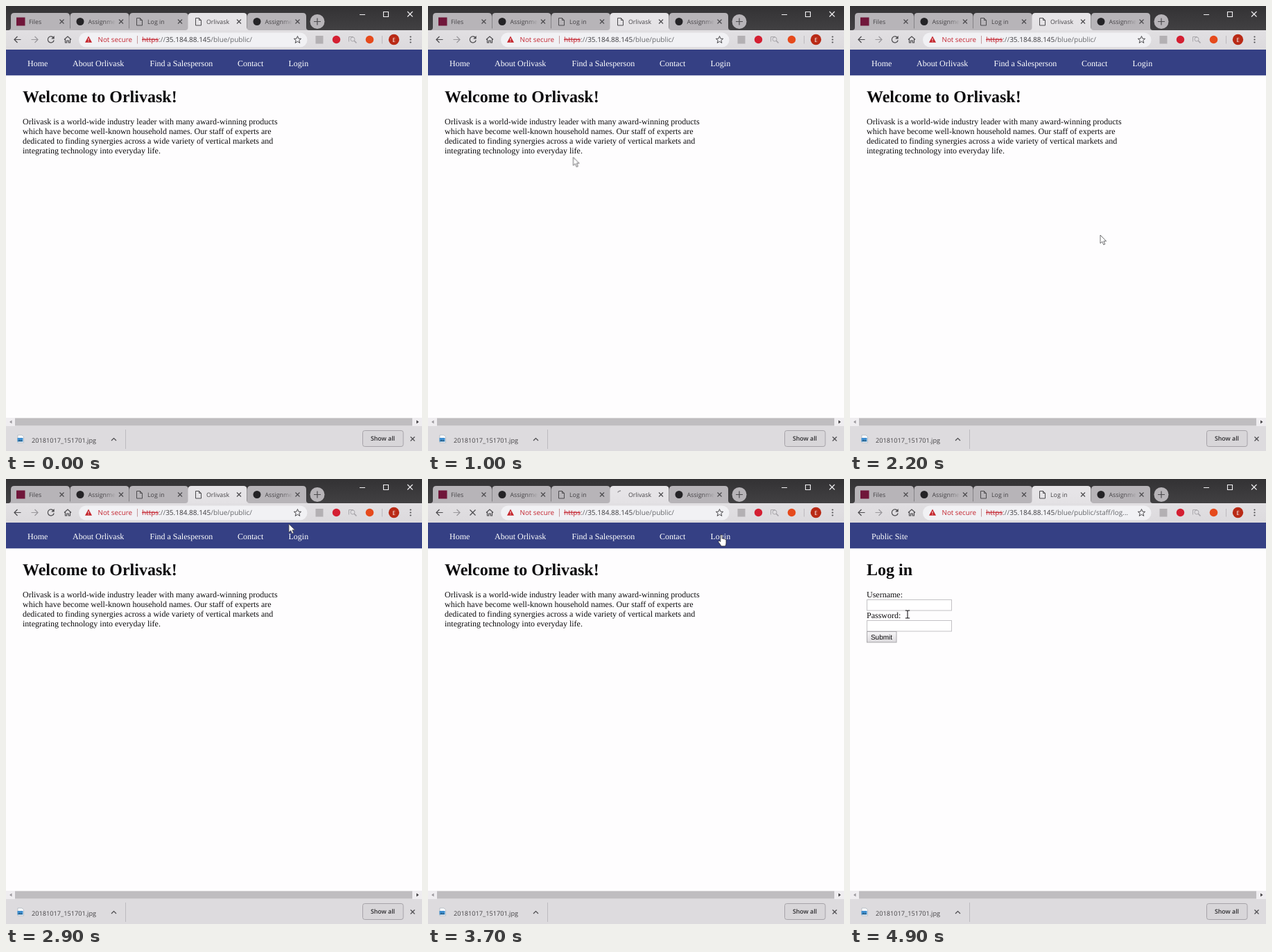
Recreate the animation shown at these times as an HTML page. Size 600 by 643 pixels, loop 5 s.

```html
<!DOCTYPE html>
<html lang="en">
<head>
<meta charset="utf-8">
<title>Browser login</title>
<style>
  html, body { margin: 0; width: 100%; height: 100%; overflow: hidden; background: #fefdfe; }
  svg { display: block; width: 600px; height: 643px; }
  text { white-space: pre; text-rendering: geometricPrecision; }

  .ui { font-family: "Open Sans", "Noto Sans", sans-serif; font-size: 8.8px; fill: #454346; }
  .url { font-size: 10px; fill: #66676b; }
  .page { font: 12px "Liberation Serif", "Times New Roman", serif; fill: #0c0b0d; }
  .nav { fill: #fff; }
  h1, .h1 { font-size: 24px; font-weight: bold; }
  .line { fill: none; stroke: #4c4b4e; stroke-width: 1.2; }
  .field { fill: #fff; stroke: #c3c1c5; }

  /* Page state: idle, loading, login page */
  .home, .login, .idle, .busy, .arrow, .hand, .beam { animation: 5s step-end infinite; }
  .home  { animation-name: home; }
  .login { animation-name: login; }
  .idle  { animation-name: idle; }
  .busy  { animation-name: busy; }
  .arrow { animation-name: arrow; }
  .hand  { animation-name: hand; }
  .beam  { animation-name: beam; }
  @keyframes home  { 0% { visibility: visible } 82%, 100% { visibility: hidden } }
  @keyframes login { 0% { visibility: hidden } 82%, 100% { visibility: visible } }
  @keyframes idle  { 0% { visibility: visible } 72% { visibility: hidden } 82%, 100% { visibility: visible } }
  @keyframes busy  { 0% { visibility: hidden } 72% { visibility: visible } 82%, 100% { visibility: hidden } }
  @keyframes arrow {
    0% { visibility: hidden } 4% { visibility: visible } 62% { visibility: hidden }
    82% { visibility: visible } 94%, 100% { visibility: hidden }
  }
  @keyframes hand { 0% { visibility: hidden } 62% { visibility: visible } 82%, 100% { visibility: hidden } }
  @keyframes beam { 0% { visibility: hidden } 94%, 100% { visibility: visible } }

  /* The pointer moves ten times a second */
  .pointer { animation: move 5s infinite; }
  @keyframes move {
    0%   { transform: translate(112px, 300px); animation-timing-function: step-end }
    4%   { transform: translate(112px, 300px); animation-timing-function: steps(3) }
    10%  { transform: translate(151px, 229px); animation-timing-function: steps(10) }
    30%  { transform: translate(268px, 208px); animation-timing-function: steps(7) }
    44%  { transform: translate(361px, 331px); animation-timing-function: steps(7) }
    58%  { transform: translate(408px, 65px);  animation-timing-function: steps(2) }
    62%  { transform: translate(423px, 81px);  animation-timing-function: step-end }
    84%  { transform: translate(423px, 81px);  animation-timing-function: steps(7) }
    98%, 100% { transform: translate(83px, 196px) }
  }

  .spin { transform-origin: 278px 22.5px; animation: spin 5s infinite; }
  @keyframes spin {
    0%   { transform: rotate(50deg); animation-timing-function: step-end }
    72%  { transform: rotate(50deg); animation-timing-function: steps(5) }
    82%, 100% { transform: rotate(-200deg) }
  }
</style>
</head>
<body>
<svg viewBox="0 0 600 643">
  <defs>
    <linearGradient id="bar" x2="0" y2="1">
      <stop stop-color="#333234"/><stop offset="1" stop-color="#424143"/>
    </linearGradient>
    <linearGradient id="chrome" gradientUnits="userSpaceOnUse" x1="0" y1="10" x2="0" y2="63">
      <stop stop-color="#e6e4e7"/><stop offset="1" stop-color="#dcdadd"/>
    </linearGradient>
    <linearGradient id="button" x2="0" y2="1">
      <stop stop-color="#f7f6f8"/><stop offset="1" stop-color="#dcdadd"/>
    </linearGradient>
    <linearGradient id="fade" gradientUnits="userSpaceOnUse" x1="24" y1="0" x2="40" y2="0">
      <stop stop-color="#454346"/><stop offset="1" stop-color="#454346" stop-opacity="0"/>
    </linearGradient>
    <path id="tab" d="M-4 25Q0 25 0 21V5Q0 0 5 0H80Q85 0 85 5V21Q85 25 89 25Z"/>
    <path id="cross" d="M-3-3 3 3M3-3-3 3"/>
    <path id="sheet" d="M.5.5H5.5L8.5 3.5V11H.5ZM5.5.5V3.5H8.5"/>
    <text id="cut" fill="url(#fade)">Assignme</text>
  </defs>

  <!-- Window frame and tabs -->
  <rect width="600" height="36" fill="url(#bar)"/>
  <g fill="#b7b4b8">
    <use href="#tab" x="7" y="10"/>
    <use href="#tab" x="92.5" y="10"/>
    <use href="#tab" x="178" y="10"/>
    <use href="#tab" x="348" y="10"/>
    <circle cx="449" cy="22.5" r="10.5"/>
  </g>
  <path d="M92.5 15V30M177.5 15V30" stroke="#858387"/>
  <use href="#tab" x="262.5" y="10" fill="url(#chrome)"/>
  <rect y="35" width="600" height="28" fill="url(#chrome)"/>

  <g class="line">
    <use href="#cross" x="80.500" y="22.500"/>
    <use href="#cross" x="166" y="22.500"/>
    <use href="#cross" x="251" y="22.500"/>
    <use href="#cross" x="336" y="22.500"/>
    <use href="#cross" x="420.500" y="22.500"/>
    <path d="M444 22.500H454M449 17.500V27.500"/>
  </g>
  <g class="line" style="stroke-width:1">
    <use href="#sheet" x="188" y="17"/>
    <use class="idle" href="#sheet" x="273" y="17"/>
  </g>
  <g class="busy">
    <path class="spin" d="M273.500 19.300A5.500 5.500 0 0 1 278 17" fill="none" stroke="#929094" stroke-width="1.300"/>
  </g>
  <rect x="15" y="16.500" width="12.500" height="12" fill="#70163a"/>
  <circle cx="107" cy="22.500" r="5.500" fill="#242326"/>
  <circle cx="362" cy="22.500" r="5.500" fill="#242326"/>

  <g class="ui">
    <text x="33" y="26">Files</text>
    <use href="#cut" x="0" y="0" transform="translate(118.500 26)"/>
    <text x="204" y="26">Log in</text>
    <text class="home" x="289" y="26">Orlivask</text>
    <text class="login" x="289" y="26">Log in</text>
    <use href="#cut" transform="translate(373.500 26)"/>
  </g>
  <path d="M510 12.500H518M544.500 8.500H551.500V15.500H544.500ZM579 8 586.500 15.500M586.500 8 579 15.500" fill="none" stroke="#f2f1f3" stroke-width="1.100"/>

  <!-- Toolbar -->
  <g class="line">
    <path d="M21.500 48.500H12.500M16.500 44 12 48.500 16.500 53"/>
    <path d="M36.500 48.500H45.500M41.500 44 46 48.500 41.500 53" stroke="#99979b"/>
    <g class="idle">
      <path d="M68.400 45.700A4.500 4.500 0 1 0 69.200 49.500"/>
      <path d="M69.700 43V47.500H65.200Z" fill="#4c4b4e" stroke="none"/>
    </g>
    <path class="busy" d="M60.500 44.500 68.500 52.500M68.500 44.500 60.500 52.500"/>
    <path d="M84 48.500 89 44 94 48.500M85.500 48V53H87.700V50H90.300V53H92.500V48"/>
  </g>
  <rect x="105" y="38.500" width="329.500" height="21" rx="10.500" fill="#f1f1f4"/>
  <path d="M119 43.500 124 52.800H114Z" fill="#c4242b"/>
  <path d="M119 46.700V49.600M119 50.500V51.600" stroke="#fff"/>
  <path d="M189.500 43V54.500" stroke="#c4989c"/>
  <g class="ui url">
    <text x="132.500" y="52.300" style="font-size:9.8px" fill="#c4242f">Not secure</text>
    <text class="home" x="196" y="52.300"><tspan fill="#c4242f" text-decoration="line-through">https</tspan>://<tspan fill="#3b3a3e">35.184.88.145</tspan>/blue/public/</text>
    <text class="login" x="196" y="52.300"><tspan fill="#c4242f" text-decoration="line-through">https</tspan>://<tspan fill="#3b3a3e">35.184.88.145</tspan>/blue/public/staff/log...</text>
  </g>
  <path class="line" style="stroke-width:1" d="M420.500 43.500 422 47.100 425.700 47.300 422.800 49.700 423.800 53.400 420.500 51.300 417.200 53.400 418.200 49.700 415.300 47.300 419 47.100Z"/>
  <rect x="446.500" y="43" width="11" height="11.500" fill="#b3b0b3"/>
  <circle cx="476.500" cy="48.500" r="5.700" fill="#d41f32"/>
  <g fill="none" stroke="#aaa8ac">
    <path d="M494.500 51.500V44.500H501"/>
    <circle cx="500" cy="48" r="3"/>
    <path d="M502.200 50.200 505.500 53.500" stroke-width="1.700"/>
  </g>
  <circle cx="524.500" cy="48.500" r="5.800" fill="#e64a1c"/>
  <path d="M542.500 43V54.500" stroke="#bdb9be"/>
  <circle cx="559.500" cy="48.500" r="7.700" fill="#b92a16"/>
  <text class="ui" x="559.500" y="51.500" text-anchor="middle" style="font-size:8px;fill:#fff">E</text>
  <g fill="#4c4b4e">
    <circle cx="583.500" cy="44.500" r="1.100"/>
    <circle cx="583.500" cy="48.500" r="1.100"/>
    <circle cx="583.500" cy="52.500" r="1.100"/>
  </g>

  <!-- Page -->
  <rect y="63" width="600" height="532" fill="#fefdfe"/>
  <rect y="63" width="600" height="37.300" fill="#354084"/>
  <g class="page home">
    <g class="nav">
      <text x="31" y="87">Home</text>
      <text x="96" y="87">About Orlivask</text>
      <text x="207.500" y="87">Find a Salesperson</text>
      <text x="334" y="87">Contact</text>
      <text x="407.500" y="87">Login</text>
    </g>
    <text class="h1" x="24" y="138.500">Welcome to Orlivask!</text>
    <text x="24" y="171.300">Orlivask is a world-wide industry leader with many award-winning products</text>
    <text x="24" y="185.300">which have become well-known household names. Our staff of experts are</text>
    <text x="24" y="199.200">dedicated to finding synergies across a wide variety of vertical markets and</text>
    <text x="24" y="213.200">integrating technology into everyday life.</text>
  </g>
  <g class="page login">
    <text class="nav" x="31" y="87">Public Site</text>
    <text class="h1" x="24" y="138.500">Log in</text>
    <text x="24" y="171.300">Username:</text>
    <rect class="field" x="24.500" y="174.500" width="122" height="15.500"/>
    <text x="24" y="201.300">Password:</text>
    <rect class="field" x="24.500" y="204.500" width="122" height="15.500"/>
    <rect x="24.500" y="220.500" width="42.500" height="15.500" fill="url(#button)" stroke="#aaa8ac"/>
    <text x="45.500" y="231.500" text-anchor="middle" style="font:10px 'Liberation Sans',Arial,sans-serif">Submit</text>
  </g>

  <!-- Scrollbar and downloads -->
  <rect y="595" width="600" height="12" fill="#efedf0"/>
  <rect x="13" y="595.500" width="573" height="11" fill="#bfbdc0"/>
  <path d="M8.500 598.500V603.500L5 601Z" fill="#99979b"/>
  <path d="M592 598.500V603.500L595.500 601Z" fill="#454346"/>
  <rect y="607" width="600" height="36" fill="#dddbde"/>
  <path d="M17 620H23L25.500 622.500V631H17Z" fill="#fafafc" stroke="#a9b2bb" stroke-width=".7"/>
  <rect x="16.500" y="624" width="8" height="5.500" fill="#3f8fd0"/>
  <path d="M17 629 19.500 626.500 21 628 22.500 627 24 629Z" fill="#285f86"/>
  <g class="ui">
    <text x="37" y="631" style="font-size:9.2px">20181017_151701.jpg</text>
    <path class="line" d="M152 628 155.500 624.500 159 628"/>
    <path d="M172.500 612V640" stroke="#bdbbbf"/>
    <rect x="514.500" y="613.500" width="58.500" height="23" rx="3" fill="#d8d6d9" stroke="#a6a3a8"/>
    <text x="543.500" y="628.300" text-anchor="middle" font-weight="600" style="fill:#2d2c2f">Show all</text>
    <use class="line" href="#cross" x="586.500" y="625.500"/>
  </g>

  <!-- Mouse pointer -->
  <g class="pointer">
    <path class="arrow" d="M0 0V12L2.800 9.400 4.800 14 6.800 13.100 4.900 8.800H8.600Z" fill="#fff" stroke="#4a494c" stroke-width=".8"/>
    <path class="hand" d="M-1.200 9.500V.800Q-1.200-.600 0-.600T1.200.800V5.200Q2.800 4.300 3.400 5.700 4.800 5 5.300 6.300 7 5.800 7 7.500V11.500Q7 14 5.700 16H-.200Q-1 13.700-3.800 10.500-4.700 9.200-3.600 8.500-2.600 8-1.200 9.500Z" fill="#fff" stroke="#26252b" stroke-width=".8"/>
    <path class="beam" d="M-3.200-6H-1Q0-6 0-5V4Q0 5-1 5H-3.200M3.200-6H1Q0-6 0-5V4Q0 5 1 5H3.200" fill="none" stroke="#18171a" stroke-width="1.100"/>
  </g>
</svg>
</body>
</html>
```
